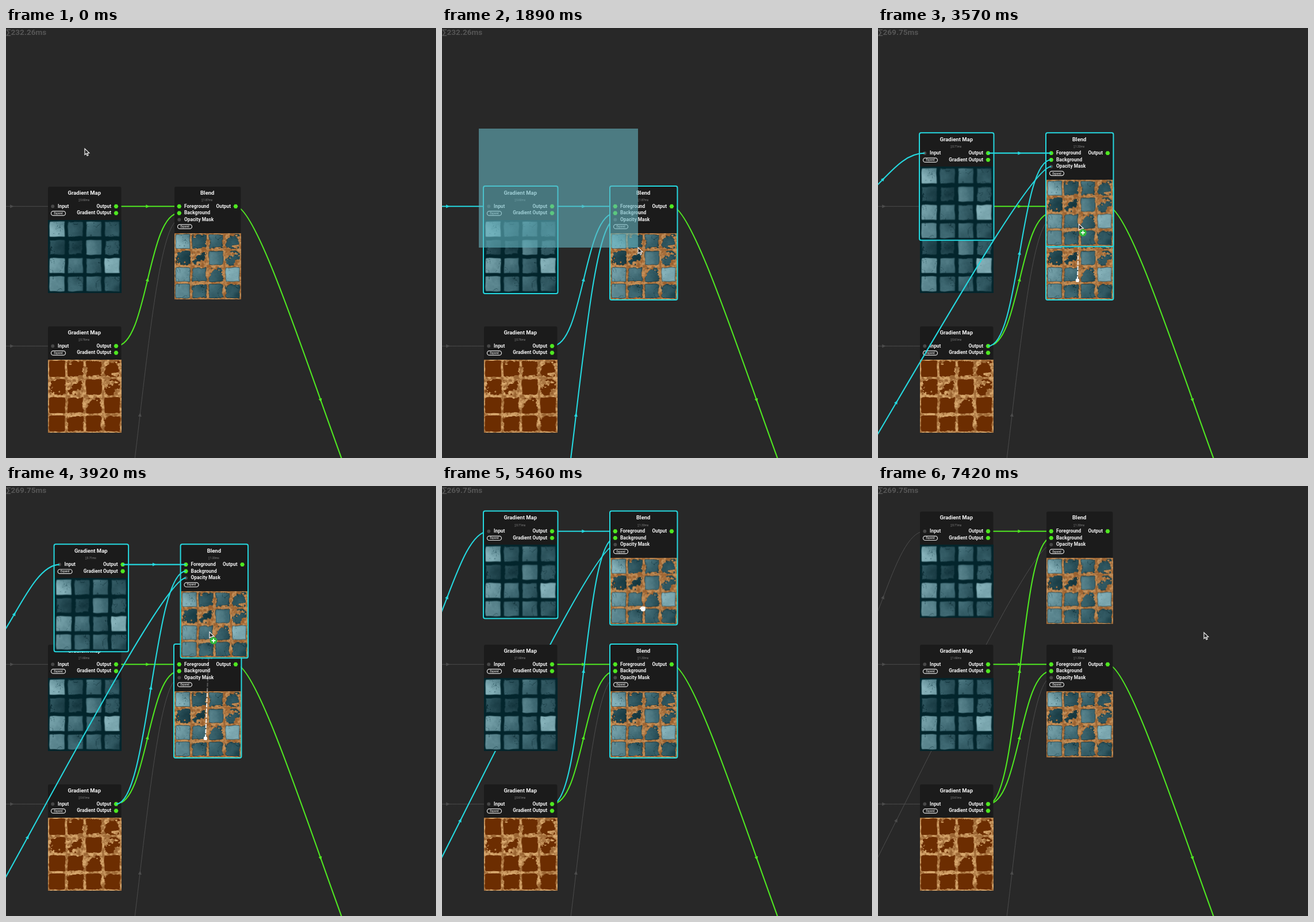
Animation, 748 px wide and 748 px high, one loop 7.49 s. Source, as an HTML page with a canvas:

```html
<!DOCTYPE html>
<html lang="en">
<head>
<meta charset="utf-8">
<title>Node graph duplicate</title>
<style>
  html, body { margin: 0; width: 100%; height: 100%; overflow: hidden; background: #282828; }
  canvas { display: block; width: 748px; height: 748px; }
</style>
</head>
<body>
<canvas id="stage" width="748" height="748"></canvas>
<script>
const ctx = document.getElementById('stage').getContext('2d');
const LOOP = 7490, STEP = 70, GRID = 11.58;
const GREEN = '#4fe721', CYAN = '#25d8df', GRAY = '#4c4c4c';
const FONT = 'Roboto, "Liberation Sans", sans-serif';

const DRAG = { boxStart: 910, boxEnd: 2030, copyStart: 3010, ready: 3570, copyEnd: 5180, deselect: 6510 };
const CURSOR = [
  [0, 137, 210], [350, 137, 210], [840, 64, 175], [980, 72, 184], [1890, 341, 382],
  [2030, 345, 386], [2520, 347, 439], [3010, 347, 439], [3290, 346, 407],
  [3920, 354, 254], [4410, 352, 226], [5040, 349, 206], [5740, 349, 206],
  [6440, 567, 255], [7490, 567, 255]
];

const lerp = (a, b, u) => a + (b - a) * u;
const clamp = (v, a = 0, b = 1) => Math.min(b, Math.max(a, v));
const smooth = u => u * u * (3 - 2 * u);
const ramp = (a, b, v) => smooth(clamp((v - a) / (b - a)));
const mix = (a, b, u) => a.map((v, i) => lerp(v, b[i], u));

// --- tile textures ---
function hash(x, y) {
  let h = Math.imul(x, 374761393) + Math.imul(y, 668265263);
  h = Math.imul(h ^ (h >>> 13), 1274126177);
  return ((h ^ (h >>> 16)) >>> 0) / 4294967296;
}
function noise(x, y) {
  const i = Math.floor(x), j = Math.floor(y), u = smooth(x - i), v = smooth(y - j);
  return lerp(lerp(hash(i, j), hash(i + 1, j), u), lerp(hash(i, j + 1), hash(i + 1, j + 1), u), v);
}
const fbm = (x, y) => noise(x, y) * .5 + noise(x * 2 + 7, y * 2 + 3) * .3 + noise(x * 4 + 1, y * 4 + 9) * .2;

const LIGHT = [[.85, .36, .48, .32], [.26, .22, .56, .32], [.85, .5, .38, .9], [.78, .42, .46, .36]];
const WEAR = [[.05, .42, .22, .4], [.5, 1, .1, .95], [.05, .15, .5, .05], [.05, .2, .2, .2]];

function sample(kind, u, v) {
  const x = u * 4, y = v * 4, i = Math.min(3, x | 0), j = Math.min(3, y | 0);
  const px = x - i - .5 + (noise(x * 3, y * 3) - .5) * .05;
  const py = y - j - .5 + (noise(x * 3 + 40, y * 3) - .5) * .05;
  const qx = Math.max(0, Math.abs(px) - .36), qy = Math.max(0, Math.abs(py) - .36);
  const inner = Math.max(Math.abs(px), Math.abs(py));
  const edge = .43 - (qx || qy ? .36 + Math.hypot(qx, qy) : inner);
  const rough = clamp((fbm(x * 4 + 5, y * 4 + 11) - .26) * 2);
  const wear = WEAR[j][i];
  const worn = edge + .012 - wear * Math.max(0, rough - .3) * .75;
  const crack = Math.abs(fbm(x * 1.7 + 20, y * 1.7) - .5) < .008 ? .25 : 0;

  const b = clamp(LIGHT[j][i] + (noise(x * 1.3 + 3, y * 1.3) - .5) * .25 - px * .2 + (rough - .5) * .08 - crack);
  const teal = b < .5 ? mix([14, 46, 54], [62, 104, 114], b * 2) : mix([62, 104, 114], [136, 180, 188], b * 2 - 1);
  if (kind === 'teal') return mix([3, 37, 44], teal, ramp(-.02, .06, edge - wear * rough * .08));

  const mask = ramp(-.02, .02, worn);
  const grain = fbm(x * 7, y * 7 + 50);
  const tan = mix([154, 100, 50], [216, 168, 110], ramp(.25, .72, grain));
  if (kind === 'rust') return mix(tan, [108, 45, 1], mask);
  return mix(mix(tan, [150, 88, 40], .3), mix([16, 44, 52], teal, ramp(-.02, .06, worn)), mask);
}

function bake(kind, size) {
  const c = document.createElement('canvas');
  c.width = c.height = size;
  const g = c.getContext('2d'), img = g.createImageData(size, size);
  for (let y = 0; y < size; y++) for (let x = 0; x < size; x++) {
    const rgb = sample(kind, (x + .5) / size, (y + .5) / size);
    img.data.set([...rgb, 255], (y * size + x) * 4);
  }
  g.putImageData(img, 0, 0);
  return c;
}
const art = { teal: bake('teal', 127), rust: bake('rust', 127), blend: bake('blend', 115) };

// --- drawing helpers ---
function text(s, x, y, size, color = '#f2f2f2', align = 'left', weight = 700) {
  ctx.font = `${weight} ${size}px ${FONT}`;
  ctx.fillStyle = color;
  ctx.textAlign = align;
  ctx.textBaseline = 'middle';
  ctx.fillText(s, x, y);
}
function box(x, y, w, h, r, fill, stroke, width = 1) {
  ctx.beginPath();
  ctx.roundRect(x, y, w, h, r);
  if (fill) { ctx.fillStyle = fill; ctx.fill(); }
  if (stroke) { ctx.strokeStyle = stroke; ctx.lineWidth = width; ctx.stroke(); }
}
function disc(x, y, r, color) {
  ctx.beginPath();
  ctx.arc(x, y, r, 0, 7);
  ctx.fillStyle = color;
  ctx.fill();
}
function pin(x, y, on) {
  if (!on) return disc(x, y, 3, '#484848');
  ctx.beginPath();
  for (let i = 0; i < 6; i++) ctx.lineTo(x + 4 * Math.cos(i * Math.PI / 3), y + 4 * Math.sin(i * Math.PI / 3));
  ctx.closePath();
  ctx.fillStyle = GREEN;
  ctx.fill();
}
function wire([x1, y1], [x2, y2], color) {
  const dx = x2 - x1, dy = y2 - y1, c = Math.min(dx / 2, 57);
  ctx.strokeStyle = ctx.fillStyle = color;
  ctx.lineWidth = color === GRAY ? 1 : 2.1;
  ctx.beginPath();
  ctx.moveTo(x1, y1);
  ctx.bezierCurveTo(x1 + c, y1, x2 - c, y2, x2, y2);
  ctx.stroke();
  ctx.save();
  ctx.translate(x1 + dx / 2, y1 + dy / 2);
  ctx.rotate(Math.atan2(dy, dx - c));
  ctx.beginPath();
  ctx.moveTo(3.5, 0);
  ctx.lineTo(-3, -3);
  ctx.lineTo(-3, 3);
  ctx.fill();
  ctx.restore();
}

// --- nodes ---
function node(n, cost, selected, thumb = true) {
  const { x, y, kind } = n, blend = kind === 'blend';
  const w = blend ? 115.5 : 127.5, top = blend ? 81 : 58, side = blend ? 115 : 127;
  const h = thumb ? top + side : top;
  const rows = [34.3, 46, 57.6].map(d => y + d);
  box(x, y, w, h, 3, '#1b1b1b');
  if (thumb) ctx.drawImage(art[kind], x, y + top, w, side);
  text(blend ? 'Blend' : 'Gradient Map', x + w / 2 - .5, y + 11.3, 9.5, '#f4f4f4', 'center');
  if (cost) text('∑' + cost + 'ms', x + w / 2 - 1, y + 23.7, 4.8, '#8c8c8c', 'center', 400);

  pin(x + 8.3, rows[0], blend);
  text(blend ? 'Foreground' : 'Input', x + 17, rows[0], 8.4);
  text('Output', x + w - 17.5, rows[0], 8.4, '#f2f2f2', 'right');
  pin(x + w - 9, rows[0], true);
  if (blend) {
    pin(x + 8.3, rows[1], true);
    text('Background', x + 17, rows[1], 8.4);
    pin(x + 8.3, rows[2], false);
    text('Opacity Mask', x + 17, rows[2], 8.4);
  } else {
    text('Gradient Output', x + w - 17.5, rows[1], 8.4, '#f2f2f2', 'right');
    pin(x + w - 9, rows[1], true);
  }
  const by = y + (blend ? 69.5 : 46.4);
  box(x + 5.5, by - 3.7, 25, 7.4, 3.7, null, '#e4e4e4', 1.2);
  text('Expand', x + 18, by + .3, 4.6, '#e0e0e0', 'center', 500);
  if (selected) box(x - 1, y - 1, w + 2, h + 2, 3, null, CYAN, 2);
}
const map = (x, y, kind) => ({ x, y, kind });
const A = map(73, 276, 'teal'), B = map(293, 276, 'blend'), C = map(73, 519, 'rust');
const inPin = (n, row = 0) => [n.x + 8.3, n.y + 34.3 + row * 11.65];
const outPin = n => [n.x + (n.kind === 'blend' ? 106.5 : 118.5), n.y + 34.3];

function links(a, b, mapFrom, maskFrom, selA, selB) {
  wire(mapFrom, inPin(a), selA ? CYAN : GRAY);
  wire(maskFrom, inPin(b, 2), selB ? CYAN : GRAY);
  wire(outPin(C), inPin(b, 1), selB ? CYAN : GREEN);
  wire(outPin(a), inPin(b), selB ? CYAN : GREEN);
}

// --- pointer ---
function cursorAt(t) {
  const i = CURSOR.findIndex((k, n) => n && t <= k[0]);
  const [t0, x0, y0] = CURSOR[i - 1], [t1, x1, y1] = CURSOR[i];
  const u = (t - t0) / (t1 - t0), e = lerp(u, smooth(u), .5);
  return [lerp(x0, x1, e), lerp(y0, y1, e)];
}
function arrow(x, y) {
  ctx.beginPath();
  [[0, 0], [0, 10.5], [2.5, 8.3], [4.2, 12.2], [6, 11.4], [4.4, 7.6], [7.8, 7.4]]
    .forEach(([a, b]) => ctx.lineTo(x + a, y + b));
  ctx.closePath();
  ctx.fillStyle = '#222';
  ctx.fill();
  ctx.strokeStyle = '#f0f0f0';
  ctx.lineWidth = 1.2;
  ctx.stroke();
}
function hand(x, y) {
  box(x - 3, y + 5, 7.5, 7, 3, '#fff');
  for (let i = 0; i < 4; i++) box(x - 3 + i * 2, y + 2.5 + Math.abs(i - 1.3) * .8, 1.5, 6, .7, '#fff');
  box(x - 5, y + 5.5, 3, 3, 1.2, '#fff');
}
function plus(x, y) {
  disc(x, y, 6.3, '#2eb83a');
  ctx.fillStyle = '#fff';
  ctx.fillRect(x - 3.5, y - .9, 7, 1.8);
  ctx.fillRect(x - .9, y - 3.5, 1.8, 7);
}
function trail(x, y) {
  const g = ctx.createLinearGradient(347, 439, x, y);
  g.addColorStop(0, '#fff');
  g.addColorStop(.4, 'rgba(255,255,255,.8)');
  g.addColorStop(.48, 'rgba(255,255,255,.25)');
  g.addColorStop(1, 'rgba(255,255,255,.15)');
  ctx.strokeStyle = g;
  ctx.lineWidth = 2;
  ctx.setLineDash([7, 2]);
  ctx.beginPath();
  ctx.moveTo(347, 439);
  ctx.lineTo(x, y);
  ctx.stroke();
  ctx.setLineDash([]);
  disc(347, 439, 3.2, '#fff');
}

function draw(t) {
  const [cx, cy] = cursorAt(t);
  const boxing = t >= DRAG.boxStart && t < DRAG.boxEnd;
  const copied = t >= DRAG.copyStart, dragging = copied && t < DRAG.copyEnd;
  const ready = t >= DRAG.ready, active = t < DRAG.deselect;
  const chosen = n => !copied && (t >= DRAG.boxEnd || boxing && cx > n.x && cy > n.y);
  const selA = chosen(A), selB = chosen(B);

  ctx.fillStyle = '#282828';
  ctx.fillRect(0, 0, 748, 748);
  text(ready ? '∑269.75ms' : '∑232.26ms', 0, 7.6, 13.6, '#555');

  let a, b;
  if (copied) {
    const p = cursorAt(Math.min(t, DRAG.copyEnd));
    const ox = Math.round((p[0] - 346) / GRID) * GRID;
    const oy = Math.min(0, Math.round((p[1] - 432) / GRID)) * GRID;
    a = map(A.x + ox, A.y + oy, 'teal');
    b = map(B.x + ox, B.y + oy, 'blend');
  }
  const copyLinks = () => links(a, b, [-63, 308], [-237, 1061], active, active);

  wire([-61, 553.3], inPin(C), GRAY);
  wire(outPin(B), [695.5, 985], GREEN);
  links(A, B, [-61, 310.3], [165, 1012], selA, selB);
  if (copied && !dragging) copyLinks();

  node(A, ready ? '1.60' : '0.60', selA);
  node(B, ready ? '1.33' : '1.87', selB || copied && active);
  node(C, ready ? '0.61' : '0.76', false);

  if (dragging) trail(cx, cy);
  if (copied) {
    node(a, ready && '0.71', active, ready);
    node(b, ready && '1.33', active, ready);
    if (dragging) copyLinks();
  }
  if (boxing) {
    ctx.fillStyle = 'rgba(101,178,190,.6)';
    ctx.fillRect(64, 175, cx - 64, cy - 175);
  }

  const hover = t >= DRAG.boxEnd && t < DRAG.copyStart || t >= DRAG.copyEnd && cx < 409;
  if (hover) hand(cx, cy);
  else arrow(cx, cy);
  if (dragging) plus(cx + 7, cy + 15);
}

const start = performance.now();
function tick() {
  const t = (performance.now() - start) % LOOP;
  draw(Math.floor(t / STEP) * STEP);
  requestAnimationFrame(tick);
}
tick();
</script>
</body>
</html>
```
